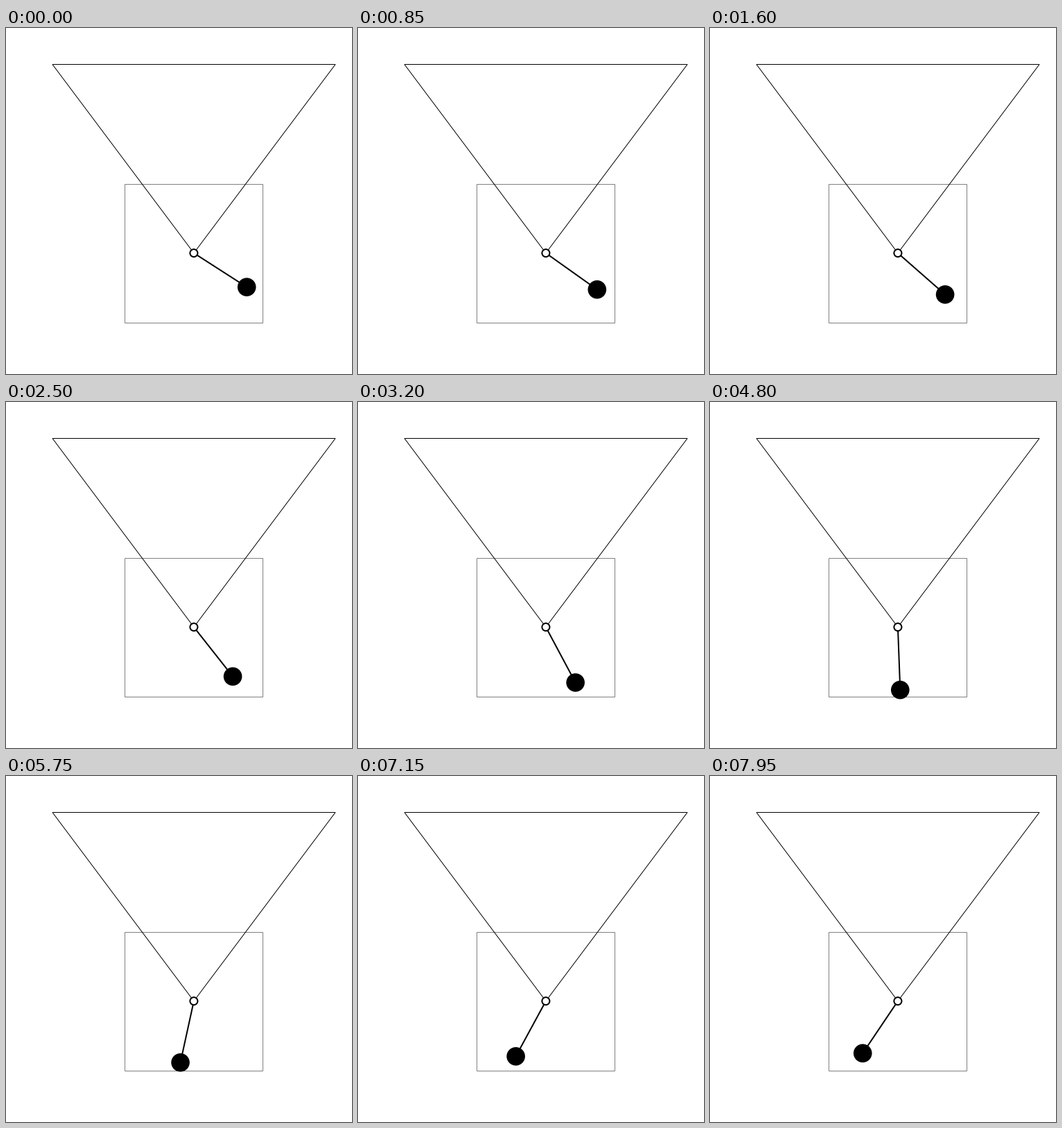
A matplotlib script for the animation above (8 s loop, 499 by 499 pixels).

```python
import math

import matplotlib.pyplot as plt
from matplotlib.animation import FuncAnimation
from matplotlib.patches import Circle, Polygon, Rectangle

SIZE = 499
DPI = 64
PX = 72 / DPI          # points per pixel
STEP_MS = 50
FRAMES = 160

PIVOT = (270.9, 324.6)
LENGTH = 90.7
STIFFNESS = 0.134      # g / length, per second squared
DAMPING = 0.096
START_ANGLE = math.radians(57.27)
START_SPEED = math.radians(-0.54)


def swing_angles(frames, substeps=10):
    """Angle of a damped pendulum at every frame (midpoint rule)."""
    def accel(angle, speed):
        return -STIFFNESS * math.sin(angle) - DAMPING * speed

    dt = STEP_MS / 1000 / substeps
    angle, speed = START_ANGLE, START_SPEED
    angles = []
    for _ in range(frames):
        angles.append(angle)
        for _ in range(substeps):
            mid_speed = speed + accel(angle, speed) * dt / 2
            mid_angle = angle + speed * dt / 2
            angle += mid_speed * dt
            speed += accel(mid_angle, mid_speed) * dt
    return angles


ANGLES = swing_angles(FRAMES)

fig = plt.figure(figsize=(SIZE / DPI, SIZE / DPI), dpi=DPI, facecolor="white")
ax = fig.add_axes([0, 0, 1, 1])
ax.set_xlim(0, SIZE)
ax.set_ylim(SIZE, 0)
ax.axis("off")

ax.add_patch(Rectangle((171.5, 224.5), 199, 200, fill=False,
                       edgecolor="0.5", linewidth=PX, zorder=1))
ax.add_patch(Polygon([(67, 52.5), (475, 52.5), PIVOT], fill=False,
                     edgecolor="black", linewidth=PX, zorder=2))
rod, = ax.plot([], [], color="black", linewidth=2 * PX, zorder=3)
bob = Circle(PIVOT, 13.3, facecolor="black", edgecolor="none", zorder=4)
ax.add_patch(bob)
ax.add_patch(Circle(PIVOT, 5.5, facecolor="white", edgecolor="black",
                    linewidth=2 * PX, zorder=5))


def draw(frame):
    angle = ANGLES[frame]
    x = PIVOT[0] + LENGTH * math.sin(angle)
    y = PIVOT[1] + LENGTH * math.cos(angle)
    rod.set_data([PIVOT[0], x], [PIVOT[1], y])
    bob.center = (x, y)
    return rod, bob


anim = FuncAnimation(fig, draw, frames=FRAMES, interval=STEP_MS,
                     repeat=True, repeat_delay=0)
plt.show()
```
